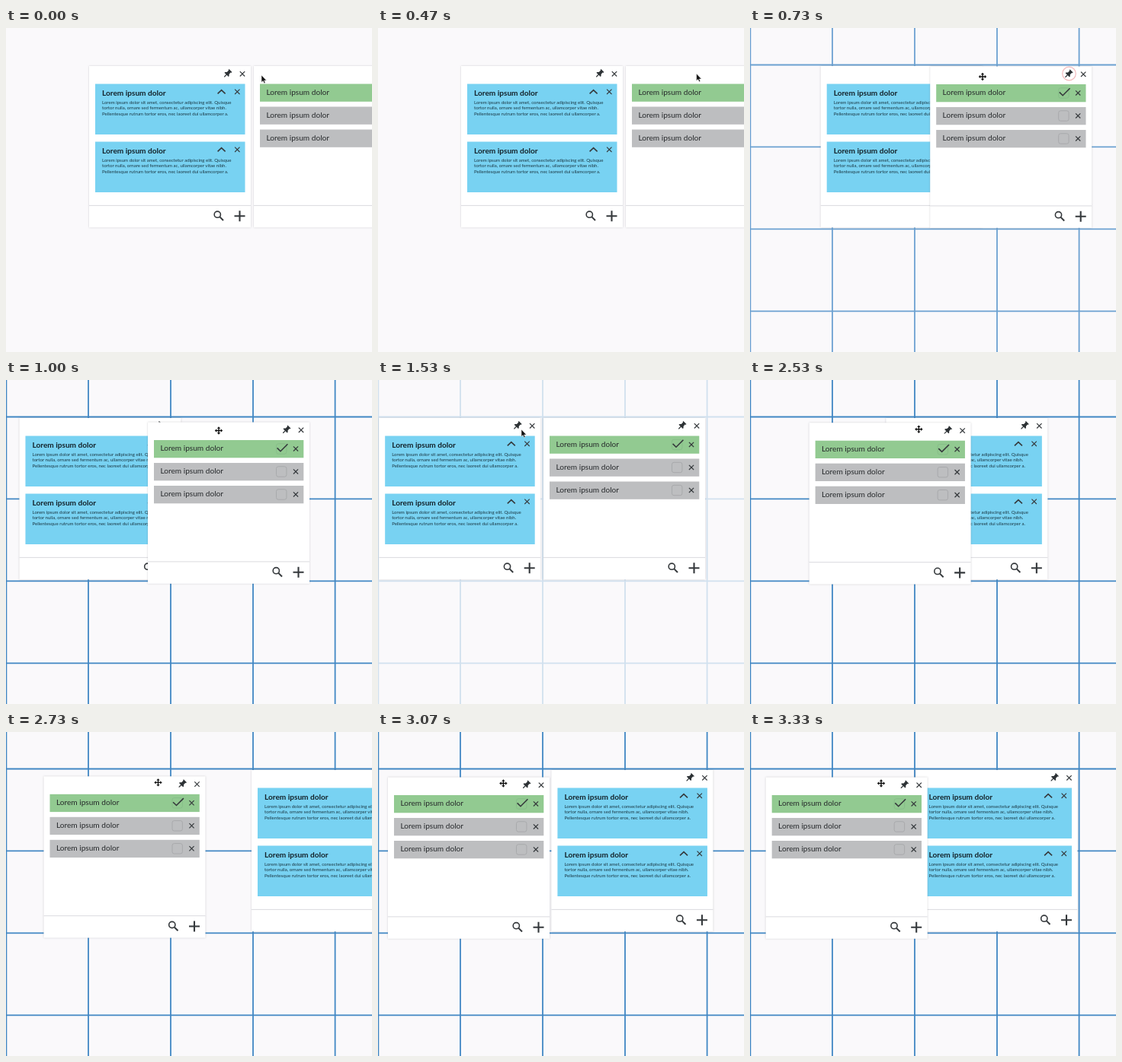
These frames come from a looping animation (480 px wide and 426 px high, 3390 ms). An HTML page:

```html
<!DOCTYPE html>
<html lang="en">
<head>
<meta charset="utf-8">
<title>Dragging panels on a grid</title>
<style>
  html, body { margin: 0; width: 100%; height: 100%; overflow: hidden; background: #faf9fb; }
  svg { display: block; width: 100vw; height: 100vh; }
  text { font-family: Lato, Carlito, sans-serif; fill: #26292b; }
  .head { font-size: 10.15px; }
  .bold { font-size: 10.1px; font-weight: 700; fill: #14232b; }
  .body { font-size: 6.08px; fill: #1b3844; }
  .panel { filter: drop-shadow(0 .8px 1.3px rgba(40, 40, 50, .22)); }
  .line { fill: none; stroke: #35393c; }
</style>
</head>
<body>
<svg id="stage" viewBox="0 0 480 426" xmlns="http://www.w3.org/2000/svg">
  <rect width="480" height="426" fill="#faf9fb"/>
  <path id="grid" fill="none" stroke="#4187c4" stroke-width="1.8"/>
  <g id="notes" class="panel"></g>
  <g id="tasks" class="panel"></g>
  <circle id="ring" fill="none" stroke="#dc3038" stroke-width="1.2"/>
  <path id="arrow" d="M0 0V9.4L2.1 7.5L3.6 10.8L5.1 10.1L3.7 7H6.6Z" fill="#111" stroke="#fff" stroke-width=".5"/>
  <path id="cross" fill="#111"
    d="M0-5.2L2.2-2.8H.7V-.7H2.8V-2.2L5.2 0L2.8 2.2V.7H.7V2.8H2.2L0 5.2L-2.2 2.8H-.7V.7H-2.8V2.2L-5.2 0L-2.8-2.2V-.7H-.7V-2.8H-2.2Z"/>
</svg>
<script>
const LOOP = 3390, STEP = 1000 / 15, LAST = 50, LAG = 35;
const $ = id => document.getElementById(id);

// Static artwork; panel coordinates start at the panel's top-left corner.
const stroke = (d, w) => `<path class="line" d="${d}" stroke-width="${w}"/>`;
const cross = (x, y, r = 3.2, w = 1.2) =>
  stroke(`M${x - r} ${y - r}l${2 * r} ${2 * r}m0 ${-2 * r}l${-2 * r} ${2 * r}`, w);
const pin = (x, y) =>
  `<path transform="translate(${x} ${y}) rotate(45)" fill="#2d3235"
    d="M-2.8-5.6H2.8V-4.3H2V-1L3.7 .8V2H.6V5.6L0 6.4L-.6 5.6V2H-3.7V.8L-2-1V-4.3H-2.8Z"/>`;

const shell = content => `
  <rect width="212" height="212.3" fill="#fff"/>
  ${pin(181.5, 10)}${cross(201, 10.3)}
  ${content}
  <path d="M0 183.4H212" stroke="#dadadf"/>
  <circle class="line" cx="168.3" cy="195.2" r="4.1" stroke-width="1.6"/>
  ${stroke('M171.4 198.4L176 203', 2)}
  ${stroke('M190.5 197.2H204.5M197.5 190.2V204.2', 2.1)}`;

const lorem = [
  'Lorem ipsum dolor sit amet, consectetur adipiscing elit. Quisque',
  'tortor nulla, ornare sed fermentum ac, ullamcorper vitae nibh.',
  'Pellentesque rutrum tortor eros, nec laoreet dui ullamcorper a.'
];
const note = y => `
  <rect x="8" y="${y}" width="196.5" height="66.5" fill="#78d2f2"/>
  <text class="bold" x="17" y="${y + 15}">Lorem ipsum dolor</text>
  ${lorem.map((s, i) => `<text class="body" x="17" y="${y + 26.2 + 7.6 * i}">${s}</text>`).join('')}
  ${stroke(`M168.6 ${y + 12.8}l5 -4.6l5 4.6`, 1.6)}
  ${cross(194.3, y + 10.3, 3.2, 1.1)}`;

const task = (y, done) => `
  <rect x="8" y="${y}" width="196.3" height="23.3" fill="${done ? '#92ca91' : '#bdbec0'}"/>
  <text class="head" x="16.4" y="${y + 14.3}">Lorem ipsum dolor</text>
  <rect x="168.5" y="${y + 4.8}" width="13.4" height="13.4" rx="2.6" fill="none"
    stroke="${done ? '#86bd88' : '#a6a8aa'}" stroke-width=".9"/>
  ${done ? stroke(`M169.6 ${y + 10.4}l4.4 4.3l9.4 -9.4`, 1.6) : ''}
  ${cross(194, y + 11.4, 3.1, 1.2)}`;

$('notes').innerHTML = shell(note(23.5) + note(99.5));
$('tasks').innerHTML = shell(task(23.5, true) + task(53.5) + task(83.5));
$('grid').setAttribute('d',
  [.4, 108, 216, 324, 431.6].map(x => `M${x} 0V426`).join('') +
  [48.5, 156.3, 264.3, 372.3].map(y => `M0 ${y}H480`).join(''));

// Pointer path: time, x, y
const path = [
  [0, 335, 62], [500, 418.5, 60], [590, 418.5, 60], [695, 329.7, 61], [730, 305, 64],
  [830, 283, 65.5], [965, 279.5, 66], [1000, 279, 66.5], [1090, 278, 66.5],
  [1530, 188, 65], [1680, 188, 65], [2130, 368, 58], [2225, 368, 58], [2270, 341.8, 59],
  [2480, 232, 64], [2695, 200.5, 66.3], [2730, 199.5, 66.4], [3030, 164, 67.5], [3330, 172, 67.5]
];
const drags = [
  { press: 530, start: 590, end: 1090, x: 418.5, y: 60.5, from: 325 },
  { press: 2200, start: 2225, end: LOOP, x: 368, y: 58, from: 217 }
];

const clamp = v => Math.max(0, Math.min(1, v));
const part = (t, a, b) => clamp((t - a) / (b - a));
const smooth = u => u * u * (3 - 2 * u);
const mix = (a, b, u) => a + (b - a) * u;

// Monotone cubic through the path points
function along(t, c) {
  const slope = i => (path[i + 1][c] - path[i][c]) / (path[i + 1][0] - path[i][0]);
  const tangent = i => {
    if (i < 1 || i > path.length - 2) return 0;
    const a = slope(i - 1), b = slope(i);
    return a * b > 0 ? 2 * a * b / (a + b) : 0;
  };
  let i = 0;
  while (i < path.length - 2 && t >= path[i + 1][0]) i++;
  const h = path[i + 1][0] - path[i][0], u = clamp((t - path[i][0]) / h);
  return mix(path[i][c], path[i + 1][c], smooth(u)) +
    h * u * (1 - u) * ((1 - u) * tangent(i) - u * tangent(i + 1));
}

function tasksAt(t) {
  const held = (d, time) => [
    d.from + along(time - LAG, 1) - d.x,
    50 + Math.max(0, along(time - LAG, 2) - d.y)
  ];
  const [a, b] = drags;
  if (t < a.start) return [a.from, 50];
  if (t < a.end) return held(a, t);
  if (t < b.start + LAG) {
    const u = smooth(part(t, a.end, a.end + 260)), [x, y] = held(a, a.end);
    return [mix(x, b.from, u), mix(y, 50, u)];
  }
  return held(b, t);
}

function notesAt(t) {
  if (t < 2300) return mix(109, 1.2, smooth(part(t, 600, 1130)));
  if (t < 2730) return mix(1.2, 322, smooth(part(t, 2300, 2730)));
  return mix(322, 217.5, smooth(part(t, 2730, 3150)));
}

const place = (id, x, y) => $(id).setAttribute('transform', `translate(${x.toFixed(2)} ${y.toFixed(2)})`);
const show = (id, v) => $(id).setAttribute('opacity', v);

function draw(ms) {
  // The picture advances 15 times a second, on whole hundredths.
  const step = Math.min(LAST, Math.floor((ms % LOOP + 3.5) / STEP));
  const t = Math.round(step * STEP / 10) * 10;
  place('notes', notesAt(t), 50);
  place('tasks', ...tasksAt(t));
  show('grid', t < 2200
    ? Math.min(part(t, 600, 770), 1 - part(t, 1100, 1650))
    : part(t, 2270, 2440));

  const drag = drags.find(d => t >= d.press && t < d.press + 300);
  show('ring', drag ? 1 - (t - drag.press) / 300 : 0);
  if (drag) {
    $('ring').setAttribute('r', 5.2 + (t - drag.press) * .018);
    place('ring', drag.x, drag.y - .5);
  }

  const down = drags.some(d => t >= d.start && t < d.end);
  show('cross', +down);
  show('arrow', +!down);
  place(down ? 'cross' : 'arrow', along(t, 1), along(t, 2));
}

const began = performance.now();
function tick() {
  draw(performance.now() - began);
  requestAnimationFrame(tick);
}
tick();
</script>
</body>
</html>
```
